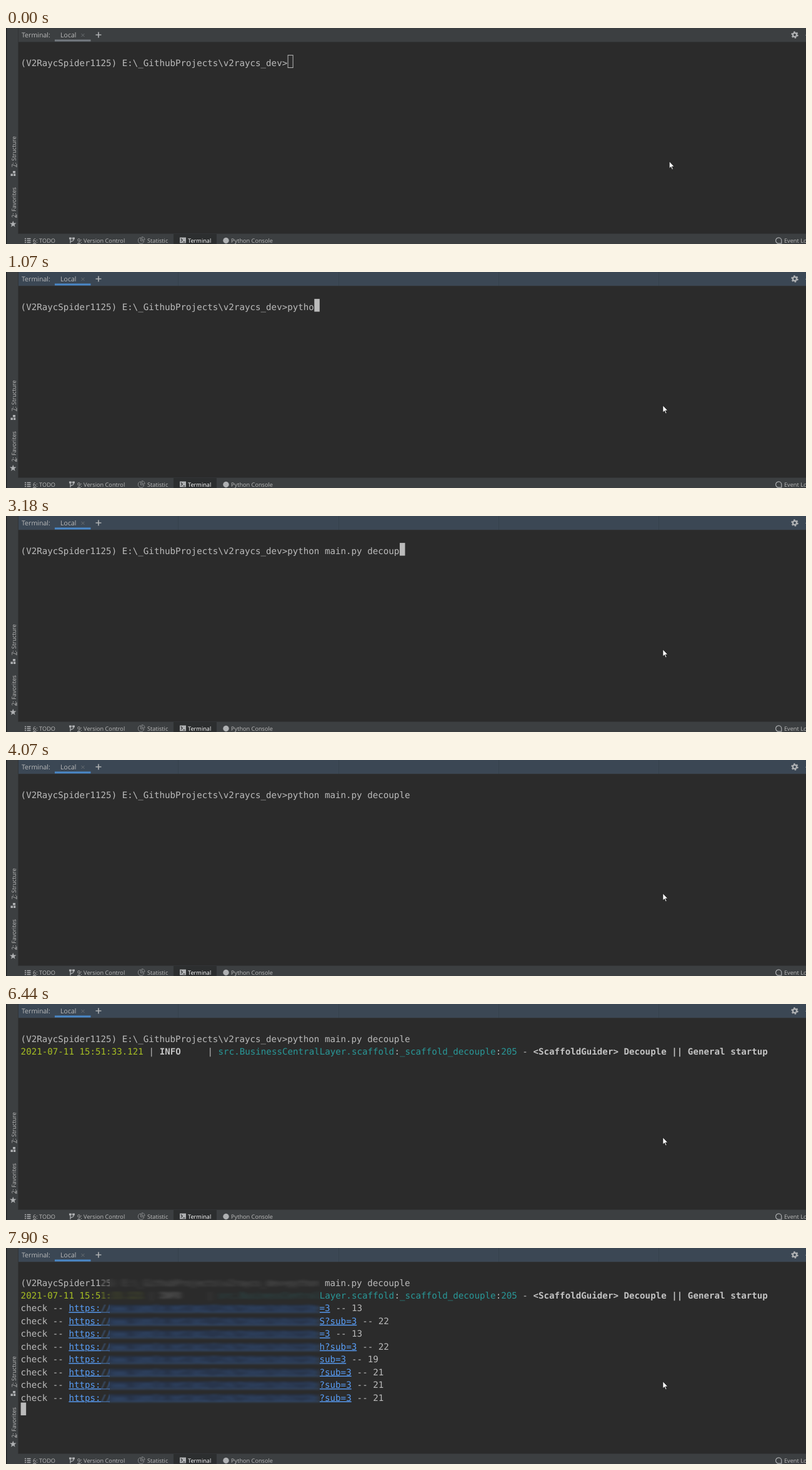
Write an HTML page that moves like this. It is 1280 px wide and 346 px high and loops after 8000 ms.

```html
<!DOCTYPE html>
<html lang="en">
<head>
<meta charset="utf-8">
<title>Terminal</title>
<style>
  html, body { margin: 0; width: 100%; height: 100%; overflow: hidden; background: #2b2b2b; }
  svg { display: block; width: 1280px; height: 346px; }
  text { white-space: pre; text-rendering: geometricPrecision; fill: #bbb; }
  .mono text { font: 14.186px "DejaVu Sans Mono", monospace; }
  .mono .date { fill: #a8c023; }
  .mono .bold { font-weight: bold; fill: #c3c3c3; }
  .mono .teal { fill: #299999; }
  .mono .link { fill: #589df6; text-decoration: underline; }
  .head text { font: 10.6px "Open Sans", "Noto Sans", sans-serif; }
  .bar text { font: 9.2px "Open Sans", "Noto Sans", sans-serif; }
  .bar .on { fill: #fff; }
  .key { text-decoration: underline; }
  .line { fill: none; stroke: #afb1b3; }
  .icon { fill: #afb1b3; }
</style>
</head>
<body>
<svg viewBox="0 0 1280 346">
  <defs>
    <g id="log" class="mono"></g>
    <g id="bands" fill="#14459a"></g>
    <filter id="blur" filterUnits="userSpaceOnUse" x="100" y="30" width="450" height="240">
      <feGaussianBlur stdDeviation="4 1.7"/>
    </filter>
    <filter id="soft" filterUnits="userSpaceOnUse" x="100" y="30" width="450" height="240">
      <feGaussianBlur stdDeviation="1.3 .7"/>
    </filter>
    <clipPath id="sides"><path d="M0 0H152V346H0ZM502 0H1280V346H502Z"/></clipPath>
    <clipPath id="edge"><path d="M152 0H166V346H152Z"/></clipPath>
    <clipPath id="middle"><path d="M164 0H502V346H164Z"/></clipPath>
  </defs>

  <rect width="1280" height="346" fill="#2b2b2b"/>

  <g class="head">
    <rect id="header" x="20" width="1260" height="22" fill="#3c3f41"/>
    <path id="seams" d="M275.5 0V22M532.5 0V22M788.5 0V22M1044.5 0V22" stroke="#35414d"/>
    <path d="M20 22.5H1280" stroke="#303234"/>
    <rect id="underline" x="78" y="18.5" width="57.5" height="3"/>
    <text x="25" y="15">Terminal:</text>
    <text x="87" y="15">Local</text>
    <path d="M120.5 9l5 5m0-5l-5 5" fill="none" stroke="#6e7275" stroke-width=".9"/>
    <path class="line" d="M148 6.5v9m-4.5-4.5h9" stroke-width="1.6"/>
    <g transform="translate(1262 11)">
      <circle class="line" r="3.1" stroke-width="2.4"/>
      <circle class="line" r="4.8" stroke-width="1.9" stroke-dasharray="2.5 2.527"/>
    </g>
    <path class="line" d="M1279 11.5H1280" opacity=".6"/>
  </g>

  <g class="bar">
    <path d="M0 0H20V330H1280V346H0Z" fill="#3c3f41"/>
    <rect width="1.3" height="346" fill="#1d1e1f"/>
    <path d="M19.5 0V330M20 329.5H1280" stroke="#323436" fill="none"/>
    <rect x="268" y="330" width="69" height="16" fill="#2c2e2f"/>

    <text transform="translate(15.5 223) rotate(-90)"><tspan class="key">7</tspan>: Structure</text>
    <text transform="translate(15.5 304) rotate(-90)"><tspan class="key">2</tspan>: Favorites</text>
    <path class="icon" d="M11 229h4v3.5h-4zM7.5 233.5h3.5v3.5h-3.5zM12 233.5h3.3v3.5h-3.3z"/>
    <path id="star" class="icon"/>

    <path class="line" d="M30 337.5h2m1.5 0h6M30 340.5h2m1.5 0h6M30 343.5h2m1.5 0h6" stroke-width="1.3"/>
    <text x="43" y="344"><tspan class="key">6</tspan>: TODO</text>

    <path class="line" d="M103 336v9M108 338v1.5q0 2-5 2.5" stroke-width="1.3"/>
    <path class="icon" d="M101 335.5h4v3h-4zM106 335.5h4v3h-4z"/>
    <text x="114" y="344"><tspan class="key">9</tspan>: Version Control</text>

    <path class="line" d="M215.5 335.8a4.7 4.7 0 1 0 5.3 5.3h-5.3zM217.5 334.6v4.6h4.6a4.6 4.6 0 0 0-4.6-4.6z" stroke-width=".8" opacity=".8"/>
    <text x="226" y="344">Statistic</text>

    <rect class="icon" x="278" y="335.5" width="10" height="9"/>
    <path d="M279.8 337.5l2.6 2.3-2.6 2.3M283 342.8h3.6" fill="none" stroke="#2c2e2f" stroke-width="1.1"/>
    <text class="on" x="291" y="344">Terminal</text>

    <circle class="icon" cx="352" cy="340.5" r="4.7"/>
    <text x="360" y="344">Python Console</text>

    <path class="line" d="M1240.8 345v-4.5a4.6 4.6 0 1 0-4.6 4.6z" stroke-width="1.2"/>
    <text x="1245" y="344">Event Log</text>
  </g>

  <g id="sharp"><use href="#log"/></g>
  <g id="smudge">
    <g clip-path="url(#edge)" opacity=".55"><g filter="url(#soft)"><use href="#log"/></g></g>
    <g clip-path="url(#middle)">
      <g filter="url(#blur)" opacity=".22"><use href="#bands"/></g>
      <g filter="url(#blur)" opacity=".32"><use href="#log"/></g>
    </g>
  </g>

  <rect id="caret"/>
  <path id="mouse" d="M0 0V11.2l2.6-2.4 1.8 4.2 1.7-.7-1.8-4.1H7.9Z" fill="#fff" stroke="#111" stroke-width=".7"/>
</svg>

<script>
const LOOP = 8000, FOCUS = 130, LOGGED = 4490, CHECKED = 7040;
const CELL = 8.54, ROW = 20.45, LEFT = 23.6, TOP = 43.1, BASELINE = 60.5;
const PROMPT = '(V2RaycSpider1125) E:\\_GithubProjects\\v2raycs_dev>';
const COMMAND = 'python main.py decouple';
const HIDDEN = '//www.sample.net/api/link/token/subscribe';
const CHECKS = [['=3', 13], ['S?sub=3', 22], ['=3', 13], ['h?sub=3', 22],
  ['sub=3', 19], ['?sub=3', 21], ['?sub=3', 21], ['?sub=3', 21]];
const LOG = [
  ['2021-07-11 15:51:33.121', 'date'], [' | '], ['INFO     ', 'bold'], ['| '],
  ['src.BusinessCentralLayer.scaffold', 'teal'], [':'], ['_scaffold_decouple', 'teal'],
  [':'], ['205', 'teal'], [' - '], ['<ScaffoldGuider> Decouple || General startup', 'bold']
];

// Each step is [start in ms, value].
const typing = [[0, 0], [790, 1], [930, 3], [1070, 5], [1210, 6], [1350, 7],
  [1630, 9], [1770, 11], [2050, 12], [2190, 13], [2340, 14], [2480, 15], [2620, 16],
  [2770, 17], [2910, 18], [3050, 20], [3180, 21], [3320, 22], [3460, 23]];
const caretRows = [[0, 0], [3660, 1], [4070, -1], [4490, 2], [5460, -1], [6020, 2], [6440, -1]];
const checkCounts = [[0, 0], [7040, 3], [7190, 5], [7330, 6], [7620, 7], [7900, 8]];

const $ = id => document.getElementById(id);
const valueAt = (steps, t) => steps.findLast(([start]) => start <= t)[1];
const escape = s => s.replace(/&/g, '&amp;').replace(/</g, '&lt;');
const set = (id, attrs) => {
  for (const name in attrs) $(id).setAttribute(name, attrs[name]);
};

function line(row, spans) {
  let col = 0;
  return spans.map(([text, style = '']) => {
    const x = LEFT + col * CELL;
    col += text.length;
    return `<text class="${style}" x="${x}" y="${BASELINE + row * ROW}">${escape(text)}</text>`;
  }).join('');
}

function checkLine([tail, count], i) {
  return line(i + 2, [['check -- '], ['https:' + HIDDEN + tail, 'link'], [` -- ${count}`]]);
}

function draw(t) {
  const typed = valueAt(typing, t), checks = valueAt(checkCounts, t);
  const focused = t >= FOCUS, blurred = t >= CHECKED;

  $('log').innerHTML = line(0, [[PROMPT + COMMAND.slice(0, typed)]]) +
    (t >= LOGGED ? line(1, LOG) : '') +
    CHECKS.slice(0, checks).map(checkLine).join('');
  $('bands').innerHTML = CHECKS.slice(0, checks).map((_, i) =>
    `<rect x="160" y="${TOP + 7 + (i + 2) * ROW}" width="338" height="12"/>`).join('');
  set('smudge', { visibility: blurred ? 'visible' : 'hidden' });
  if (blurred) set('sharp', { 'clip-path': 'url(#sides)' });
  else $('sharp').removeAttribute('clip-path');

  const row = blurred ? checks + 2 : valueAt(caretRows, t);
  const col = row === 0 ? PROMPT.length + typed : 0;
  const inset = focused ? 0 : .5;
  set('caret', {
    x: LEFT + col * CELL + inset, y: TOP + row * ROW + inset,
    width: CELL - inset, height: ROW - inset,
    fill: focused ? '#bbb' : 'none', stroke: focused ? 'none' : '#bbb',
    visibility: row < 0 ? 'hidden' : 'visible'
  });

  set('header', { fill: focused ? '#3b4754' : '#3c3f41' });
  set('seams', { visibility: focused ? 'visible' : 'hidden' });
  set('underline', { fill: focused ? '#4a88c7' : '#747a80' });
  set('mouse', { transform: `translate(${focused ? 1051 : 1061.3} 213.7)` });
}

const star = Array.from({ length: 10 }, (_, i) => {
  const r = i % 2 ? 2.3 : 5.6, a = i * Math.PI / 5;
  return `${11.3 + r * Math.sin(a)} ${314.3 - r * Math.cos(a)}`;
});
set('star', { d: `M${star.join('L')}Z` });

const moments = [...new Set([FOCUS, ...[typing, caretRows, checkCounts].flat().map(s => s[0])])]
  .sort((a, b) => a - b).map(t => [t, t]);
const begin = performance.now();
let shown = -1;

function tick() {
  const moment = valueAt(moments, (performance.now() - begin) % LOOP);
  if (moment !== shown) draw(shown = moment);
  requestAnimationFrame(tick);
}
tick();
</script>
</body>
</html>
```
